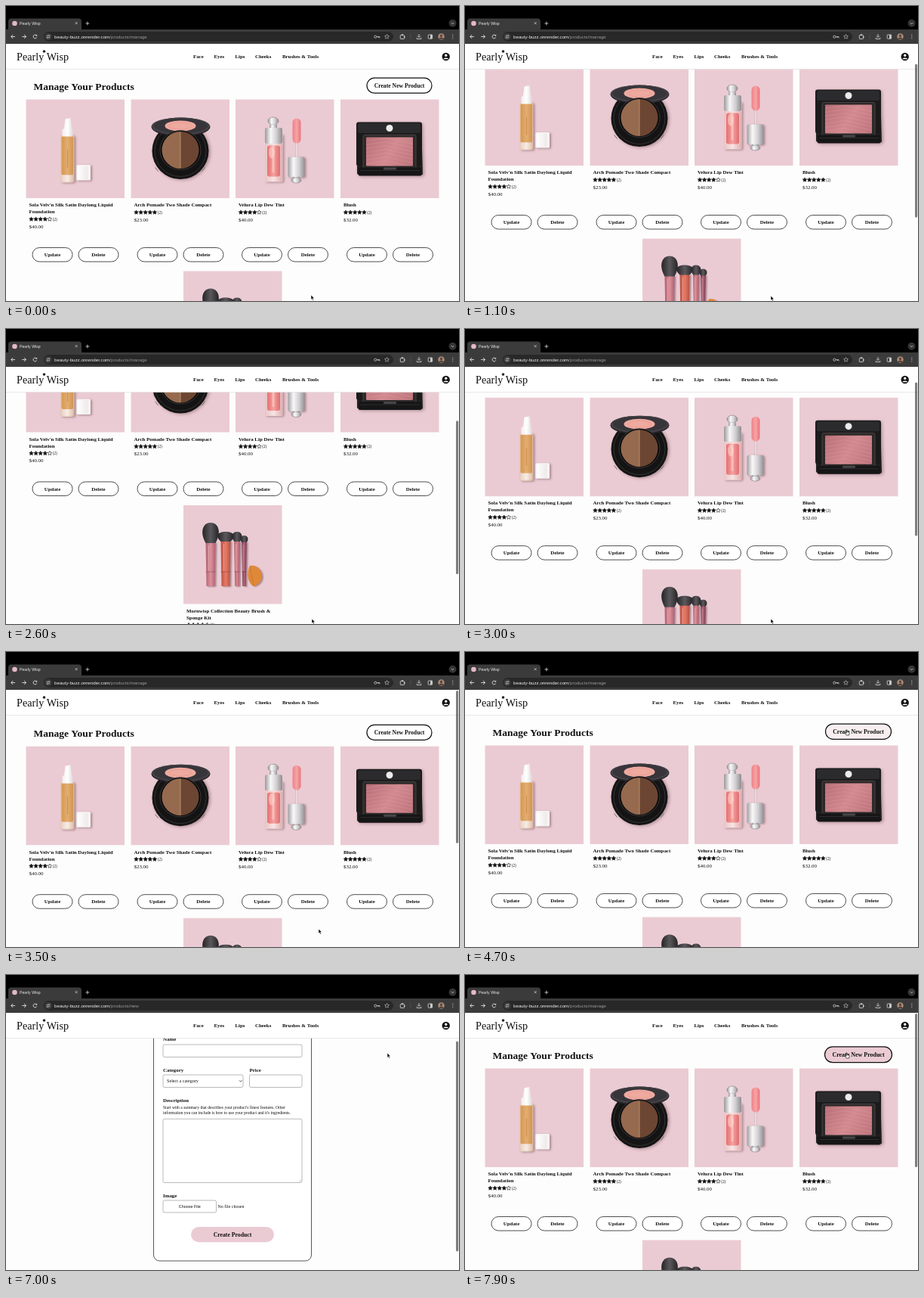
An HTML page with a canvas that plays this animation: 600 by 390 pixels, repeating every 8 s.

```html
<!DOCTYPE html>
<html lang="en">
<head>
<meta charset="utf-8">
<title>Pearly Wisp</title>
<style>
html, body { margin: 0; width: 100%; height: 100%; overflow: hidden; background: #fdfdfd; }
canvas { display: block; width: 600px; height: 390px; }
</style>
</head>
<body>
<canvas id="stage"></canvas>
<script>
const LOOP = 8000, STEP = 100;
const SERIF = '"Liberation Serif", serif', SANS = '"Liberation Sans", sans-serif';
const PINK = '#ebcbd3', INK = '#111';
const canvas = document.getElementById('stage');
const c = canvas.getContext('2d');
const dpr = window.devicePixelRatio || 1;
canvas.width = 600 * dpr;
canvas.height = 390 * dpr;

const scrollKeys = [[200, 0], [1100, 43], [2000, 176.5], [2200, 186], [2600, 117.5],
  [3200, 4], [3350, -4], [3500, -1.2], [3900, 0]];
const formKeys = [[5700, 0], [6100, 57], [6350, 73], [6600, 75], [6700, 75], [7100, 34], [7600, 0]];
const cursorX = [[0, 404], [100, 405], [3200, 405], [3500, 414], [4100, 452], [4700, 505]];
const cursorY = [[0, 382], [100, 383], [3200, 383], [3500, 366], [4100, 235], [4700, 103]];

const clamp01 = v => Math.min(1, Math.max(0, v));
const ramp = (t, a, b) => clamp01((t - a) / (b - a));

// Monotone cubic interpolation through [time, value] keys
function track(keys, t) {
  const last = keys.length - 1;
  if (t <= keys[0][0]) return keys[0][1];
  if (t >= keys[last][0]) return keys[last][1];
  const i = keys.findIndex(k => k[0] > t) - 1;
  const slope = j => (keys[j + 1][1] - keys[j][1]) / (keys[j + 1][0] - keys[j][0]);
  const tangent = j => {
    if (j === 0 || j === last) return 0;
    const a = slope(j - 1), b = slope(j);
    return a * b <= 0 ? 0 : 2 * a * b / (a + b);
  };
  const h = keys[i + 1][0] - keys[i][0], u = (t - keys[i][0]) / h, v = 1 - u;
  return keys[i][1] * (1 + 2 * u) * v * v + tangent(i) * h * u * v * v +
    keys[i + 1][1] * u * u * (3 - 2 * u) - tangent(i + 1) * h * u * u * v;
}

function paint(fill, stroke, width = 1) {
  if (fill) { c.fillStyle = fill; c.fill(); }
  if (stroke) { c.strokeStyle = stroke; c.lineWidth = width; c.stroke(); }
}
function box(x, y, w, h, r, fill, stroke, width) {
  c.beginPath();
  c.roundRect(x, y, w, h, r);
  paint(fill, stroke, width);
}
function oval(x, y, rx, ry, fill, stroke, width) {
  c.beginPath();
  c.ellipse(x, y, rx, ry, 0, 0, 7);
  paint(fill, stroke, width);
}
function shape(points, fill, stroke, width) {
  c.beginPath();
  points.forEach(([x, y]) => c.lineTo(x, y));
  c.closePath();
  paint(fill, stroke, width);
}
function lines(color, width, ...paths) {
  c.beginPath();
  for (const p of paths)
    for (let i = 0; i < p.length; i += 2) i ? c.lineTo(p[i], p[i + 1]) : c.moveTo(p[i], p[i + 1]);
  paint(null, color, width);
}
function text(str, x, y, size, { font = SERIF, weight = 'bold', color = INK, align = 'left' } = {}) {
  c.font = `${weight} ${size}px ${font}`;
  c.fillStyle = color;
  c.textAlign = align;
  c.fillText(str, x, y);
}
function across(x0, x1, ...colors) {
  const g = c.createLinearGradient(x0, 0, x1, 0);
  colors.forEach((col, i) => g.addColorStop(i / (colors.length - 1), col));
  return g;
}
function shadowed(blur, draw) {
  c.save();
  c.shadowColor = 'rgba(70,35,45,.4)';
  c.shadowBlur = blur * dpr;
  c.shadowOffsetX = 2 * dpr;
  c.shadowOffsetY = dpr;
  draw();
  c.restore();
}

// Product pictures, in coordinates of a 130.5 px square
function foundation() {
  shadowed(3, () => box(66.5, 86.5, 19, 20.5, 1.5, '#f7f3f4'));
  box(68, 88, 14, 18, 1, across(68, 82, '#fff', '#eee8ea'));
  shadowed(3, () => box(45.5, 47, 18.5, 63, 3, across(45, 64, '#e3c6b4', '#f0dccd', '#d9b49a')));
  box(47, 48, 15.5, 52, 2.5, across(47, 63, '#d6974f', '#e3ae72', '#d0934f'));
  box(47, 100, 15.5, 8.5, 2, across(47, 63, '#e8d3c6', '#f8ece5', '#dfc0ad'));
  shape([[52, 26], [59, 24.5], [60.5, 38], [62, 40], [62, 49], [48, 49], [48, 40], [50.5, 38]],
    across(48, 62, '#f1edee', '#fff', '#dfdadd'));
  lines('#c7864b', .8, [55, 66, 55, 90]);
}
function browCompact() {
  shadowed(4, () => oval(65.5, 68, 37.5, 37.5, '#151415'));
  oval(65.5, 68, 34, 34, null, '#3b393a', .8);
  oval(66, 36.5, 39, 12.5, '#272529');
  oval(66, 35.5, 38.5, 11.5, '#444248');
  oval(66, 35, 36, 10, '#37353a');
  oval(65.5, 35, 20.5, 7, '#efaaa0');
  oval(65.5, 35, 15, 4.5, null, '#dd9188', .5);
  oval(65.5, 67, 27, 26, '#0b0b0c', '#454143', .8);
  for (const side of [-1, 1]) {
    c.beginPath();
    c.arc(65.5, 67, 24.5, -Math.PI / 2, Math.PI / 2, side < 0);
    paint(side < 0 ? '#966a4e' : '#6c4632');
  }
  lines('#c59c76', .8, [65.5, 43, 65.5, 91]);
  lines('#555', .8, [32, 90, 36, 95], [94, 95, 98, 90]);
}
function lipTint() {
  const silver = (a, b) => across(a, b, '#9b999c', '#f9f8f9', '#d1ced1', '#8f8d91');
  shadowed(3, () => box(38.5, 46, 24, 63, 2, '#efd3d5'));
  oval(50, 28.5, 7, 5, silver(43, 57), '#7d7b7f', .6);
  box(45, 33, 10, 6, 1, silver(45, 55));
  box(39, 37.5, 23, 21, 2, silver(39, 62));
  box(39, 58.5, 23, 50, 2, across(39, 62, '#e9c3c4', '#f7e4e3', '#e2aeb0'));
  box(42, 61, 17, 41, 3, across(42, 59, '#e66f72', '#f5a29e', '#dd6d72'));
  oval(48, 70, 4, 8, 'rgba(255,225,220,.5)');
  box(48.5, 60, 3, 37, 1, 'rgba(255,210,205,.6)');
  box(79.5, 54, 3, 27, 1, '#eadadd', '#c4aeb3', .5);
  box(75.5, 25, 11, 33, 5.5, across(75, 87, '#ed7e84', '#f7a4a6', '#e67077'));
  shadowed(3, () => box(69.5, 76, 22, 27, 2, silver(69, 92)));
  box(76, 102, 9, 4, 1, silver(76, 85));
  oval(80.5, 107, 6.5, 3.5, silver(74, 87), '#7d7b7f', .6);
}
function blush() {
  shadowed(4, () => shape([[22, 31], [107, 31], [109, 99], [106, 101], [25, 101], [22, 98]], '#202021'));
  box(21, 30, 87, 58, 3, '#1b1b1c');
  box(23, 31.5, 83, 13, 2, '#2b2a2c');
  oval(65, 38, 4.5, 4.5, '#ececec');
  box(30, 47, 70, 45, 2, '#2c2929', '#59494b', .8);
  const g = c.createLinearGradient(35, 50, 96, 90);
  g.addColorStop(0, '#b96f77');
  g.addColorStop(.5, '#d28a90');
  g.addColorStop(1, '#bd737b');
  box(34, 50, 62, 38, 1, g);
  c.save();
  c.clip();
  for (let i = 0; i < 9; i++)
    lines('rgba(235,170,172,.32)', .8, [34, 55 + i * 5, 60, 51 + i * 5, 96, 59 + i * 5]);
  c.restore();
  box(24, 90, 83, 10.5, 2, '#161617');
  box(57, 90, 17, 3, 1, '#484649');
  lines('#3d3b3e', .6, [26, 94, 105, 94]);
}
function brushes() {
  const brush = (x, w, top, neck, rx, ry, tint, dark) => {
    shadowed(2, () => shape([[x - w / 2, neck], [x + w / 2, neck], [x + w / 2 - 1, 107], [x - w / 2 + 1, 107]],
      across(x - w / 2, x + w / 2, dark, tint, dark)));
    lines('rgba(255,225,220,.55)', .8, [x - w / 5, neck + 4, x - w / 5, 87]);
    lines('rgba(90,35,50,.5)', .7, [x - w / 2, 88, x + w / 2, 88]);
    c.beginPath();
    c.moveTo(x - w / 2, neck + 1);
    c.bezierCurveTo(x - rx * 1.5, neck - ry, x - rx, top, x, top);
    c.bezierCurveTo(x + rx, top, x + rx * 1.5, neck - ry, x + w / 2, neck + 1);
    paint(across(x - rx, x + rx, '#29282b', '#5b585c', '#29282b'));
  };
  brush(36, 13, 23, 49, 10, 14, '#de929c', '#ae5f70');
  brush(56, 13, 35, 47, 10, 7, '#e77b66', '#b74f43');
  brush(71, 7.5, 35, 47, 6, 6, '#d98993', '#a95767');
  brush(80.5, 6.5, 40, 48, 4.5, 3, '#b56379', '#74384e');
  shadowed(2, () => {
    c.beginPath();
    c.moveTo(88, 80);
    c.bezierCurveTo(97, 78, 104, 86, 104, 94);
    c.bezierCurveTo(104, 101, 98, 106, 93, 107);
    c.bezierCurveTo(84, 103, 84, 88, 88, 80);
    paint('#df8838');
  });
  lines('#c77129', .7, [88, 81, 93, 106]);
}

const products = [
  { x: 26.5, name: ["Sola Velv'n Silk Satin Daylong Liquid", 'Foundation'], stars: 4, price: '$40.00', draw: foundation },
  { x: 165.5, name: ['Arch Pomade Two Shade Compact'], stars: 5, price: '$23.00', draw: browCompact },
  { x: 304, name: ['Velura Lip Dew Tint'], stars: 4, price: '$40.00', draw: lipTint },
  { x: 443, name: ['Blush'], stars: 5, price: '$32.00', draw: blush },
  { x: 235, y: 227, name: ['Mornwisp Collection Beauty Brush &', 'Sponge Kit'], stars: 4.5, price: '$19.99', draw: brushes }
];

function star(x, y, r, fill, stroke) {
  const pts = Array.from({ length: 10 }, (_, i) => {
    const a = -Math.PI / 2 + i * Math.PI / 5, d = i % 2 ? r * .48 : r;
    return [x + d * Math.cos(a), y + d * Math.sin(a)];
  });
  shape(pts, fill, stroke, .6);
}
function rating(x, y, value) {
  for (let i = 0; i < 5; i++) {
    const sx = x + 3 + i * 6.1, part = clamp01(value - i);
    star(sx, y, 2.9, part === 1 ? INK : null, INK);
    if (part === .5) {
      c.save();
      c.beginPath();
      c.rect(sx - 4, y - 4, 4, 8);
      c.clip();
      star(sx, y, 2.9, INK);
      c.restore();
    }
  }
  text('(2)', x + 31.3, y + 1.8, 5.2, { weight: 'normal' });
}
function pill(label, x, y) {
  box(x, y, 53, 18.5, 9.25, '#fff', '#222', .8);
  text(label, x + 26.5, y + 11.5, 6.9, { align: 'center' });
}
function card(p) {
  c.save();
  c.translate(p.x, 123.5 + (p.y || 0));
  box(0, 0, 130.5, 130.5, 0, PINK);
  p.draw();
  p.name.forEach((line, i) => text(line, 4, 141.8 + i * 9, 6.9));
  const drop = (p.name.length - 1) * 9;
  rating(4, 149.3 + drop, p.stars);
  text(p.price, 4, 161.3 + drop, 6.9, { weight: 'normal' });
  pill('Update', 8.5, 196);
  pill('Delete', 69.5, 196);
  c.restore();
}

function managePage(hover) {
  text('Manage Your Products', 36.5, 110.7, 13.5);
  c.save();
  c.translate(521, 105.2);
  c.scale(1 + .035 * hover, 1 + .035 * hover);
  box(-43, -10, 86, 20, 10, '#fff');
  c.globalAlpha = hover;
  box(-43, -10, 86, 20, 10, PINK);
  c.globalAlpha = 1;
  box(-43, -10, 86, 20, 10, null, INK, 1.2);
  text('Create New Product', 0, 2.8, 7.7, { align: 'center' });
  c.restore();
  products.forEach(card);
}

function formPage() {
  const field = (x, y, w, h) => box(x, y, w, h, 2, '#fff', '#8c8c8c', .6);
  const plain = { weight: 'normal' };
  box(195.5, 93, 209, 330, 8, '#fff', '#444', .9);
  text('Create New Product', 300, 113, 12, { align: 'center' });
  text('Name', 208, 132.5, 6.9);
  field(208, 137, 184, 16.5);
  text('Category', 208, 172.8, 6.9);
  text('Price', 322.5, 172.8, 6.9);
  field(208, 177, 106, 16.5);
  field(322.5, 177, 69.5, 16.5);
  text('Select a category', 213, 187.3, 6.15, plain);
  lines('#333', .8, [309, 184.3, 310.8, 186.2, 312.6, 184.3]);
  text('Description', 208, 213, 6.9);
  text("Start with a summary that describes your product's finest features. Other", 208, 222.2, 5.6, plain);
  text("information you can include is how to use your product and it's ingredients.", 208, 229.4, 5.6, plain);
  field(208, 235.3, 184, 84.2);
  lines('#888', .5, [388, 318.5, 391, 315.5], [390, 318.5, 391, 317.5]);
  text('Image', 208, 339, 6.9);
  field(208, 343, 70.5, 16);
  text('Choose File', 243.3, 353, 5.45, { font: SANS, weight: 'normal', align: 'center' });
  text('No file chosen', 280.5, 353, 6, plain);
  box(245, 378, 110, 20.3, 10.15, PINK);
  text('Create Product', 300, 391, 7.75, { align: 'center' });
}

function siteHeader() {
  box(0, 50, 600, 33.5, 0, '#fff');
  lines('#dedede', .7, [0, 83.6, 600, 83.6]);
  text('Pearly Wisp', 14, 72, 14.2, { weight: 'normal' });
  oval(50.5, 60, 1.8, 1.8, '#222');
  [['Face', 248], ['Eyes', 275.5], ['Lips', 303.5], ['Cheeks', 330], ['Brushes & Tools', 366]]
    .forEach(([label, x]) => text(label, x, 69.4, 6.85));
  oval(582.7, 67, 5.2, 5.2, INK);
  oval(582.7, 65.3, 1.7, 1.7, '#fff');
  c.beginPath();
  c.ellipse(582.7, 70.3, 3.2, 1.9, 0, Math.PI, 0);
  paint('#fff');
}

function browser(path) {
  const grey = '#c9c9c9', bar = '#3b3b3b';
  box(0, 0, 600, 50, 0, '#000');
  box(3, 16.5, 97, 20, 4, bar);
  box(0, 31, 600, 19, 0, bar);
  oval(11.5, 23, 3.3, 3.3, '#e5b8c4');
  text('Pearly Wisp', 18, 24.9, 5.2, { font: SANS, weight: 'normal', color: '#e8e8e8' });
  lines('#ddd', .7, [91.7, 21.2, 94.7, 24.2], [94.7, 21.2, 91.7, 24.2]);
  lines('#ddd', .8, [105.5, 23, 110.3, 23], [107.9, 20.6, 107.9, 25.4]);
  oval(591.5, 22.7, 5, 5, '#343434');
  lines('#ddd', .8, [589.7, 22, 591.5, 23.8, 593.3, 22]);

  lines('#e3e3e3', .9, [12, 40.5, 6.8, 40.5], [9.2, 38, 6.7, 40.5, 9.2, 43],
    [21.3, 40.5, 26.5, 40.5], [24.1, 38, 26.6, 40.5, 24.1, 43]);
  c.beginPath();
  c.arc(38.5, 40.5, 2.4, .4, 5.5);
  paint(null, '#e3e3e3', .9);
  shape([[39, 39.8], [41.2, 39.8], [41.2, 37.5]], '#e3e3e3');

  box(50, 34, 463, 13, 6.5, '#282828');
  oval(56, 40.5, 4.6, 4.6, '#3d3d3d');
  lines('#ddd', .7, [53.8, 39.3, 56, 39.3], [56, 41.8, 58.2, 41.8]);
  oval(57.2, 39.3, .8, .8, null, '#ddd', .6);
  oval(54.8, 41.8, .8, .8, null, '#ddd', .6);
  const host = 'beauty-buzz.onrender.com';
  text(host, 64, 42.6, 6.2, { font: SANS, weight: 'normal', color: '#f1f1f1' });
  text(path, 64 + c.measureText(host).width, 42.6, 6.2, { font: SANS, weight: 'normal', color: '#9a9a9a' });

  oval(489.3, 40.7, 1.6, 1.6, null, grey, .8);
  lines(grey, .9, [491, 40.7, 495, 40.7, 495, 42.3], [493.3, 40.7, 493.3, 42]);
  star(504.5, 40.6, 3.1, null, grey);
  box(522.3, 38.5, 5.2, 5, .7, null, grey, .9);
  oval(525, 38.2, 1.1, 1.1, grey);
  oval(527.8, 41, 1.1, 1.1, grey);
  lines('#5a5a5a', .6, [536, 37, 536, 44]);
  lines(grey, .9, [547, 37, 547, 41.3], [545, 39.5, 547, 41.5, 549, 39.5], [544.2, 41.8, 544.2, 43.6, 549.8, 43.6, 549.8, 41.8]);
  box(559.2, 38, 5.4, 5.2, .6, null, grey, .9);
  box(562, 38, 2.6, 5.2, 0, grey);
  oval(576.5, 40.5, 4.2, 4.2, '#a98c79');
  oval(576.5, 39.4, 1.6, 1.8, '#5a4238');
  c.beginPath();
  c.ellipse(576.5, 43.9, 2.8, 2.3, 0, Math.PI, 0);
  paint('#5a4238');
  for (const y of [38.2, 40.5, 42.8]) oval(591.8, y, .6, .6, grey);
}

function arrow(x, y) {
  const pts = [[0, 0], [0, 6.2], [1.4, 5], [2.3, 7.2], [3.4, 6.7], [2.5, 4.6], [4.4, 4.5]];
  shape(pts.map(([a, b]) => [x + a, y + b]), '#000', '#fff', .6);
}
function hand(x, y) {
  const pts = [[0, 0], [1.1, 0], [1.2, 2.6], [3.8, 3.2], [4.2, 4.2], [3.5, 7], [.2, 7], [-1.8, 4.2], [-1.2, 3.6], [0, 4.5]];
  shape(pts.map(([a, b]) => [x + a, y + b]), '#fff', '#111', .7);
}

function scrollbar(scroll, ratio, length, alpha) {
  if (alpha <= 0) return;
  const squeeze = Math.min(0, scroll);
  box(596, 51 + Math.max(0, scroll) * ratio, 3.2, length + squeeze, 1.6, `rgba(0,0,0,${.5 * alpha})`);
}

function render(t) {
  const onForm = t >= 5300 && t < 7700;
  const scroll = track(onForm ? formKeys : scrollKeys, t);
  const hover = t < 5300 ? ramp(t, 4600, 4900) : ramp(t, 7600, 7900);

  c.setTransform(dpr, 0, 0, dpr, 0, 0);
  box(0, 0, 600, 390, 0, '#fdfdfd');
  c.save();
  c.translate(0, -scroll);
  onForm ? formPage() : managePage(hover);
  c.restore();
  siteHeader();
  browser(onForm ? '/products/new' : '/products/manage');

  if (onForm) scrollbar(scroll, .81, 278, t >= 5800 ? 1 : 0);
  else scrollbar(scroll, .597, 203, t >= 7700 ? ramp(t, 7700, 7800) : t >= 300 ? 1 - ramp(t, 4300, 4700) : 0);

  const x = track(cursorX, t), y = track(cursorY, t);
  !onForm && t >= 4700 ? hand(x, y) : arrow(x, y);
}

const start = performance.now();
function frame() {
  const t = (performance.now() - start) % LOOP;
  render(Math.floor(t / STEP) * STEP);
  requestAnimationFrame(frame);
}
frame();
</script>
</body>
</html>
```
